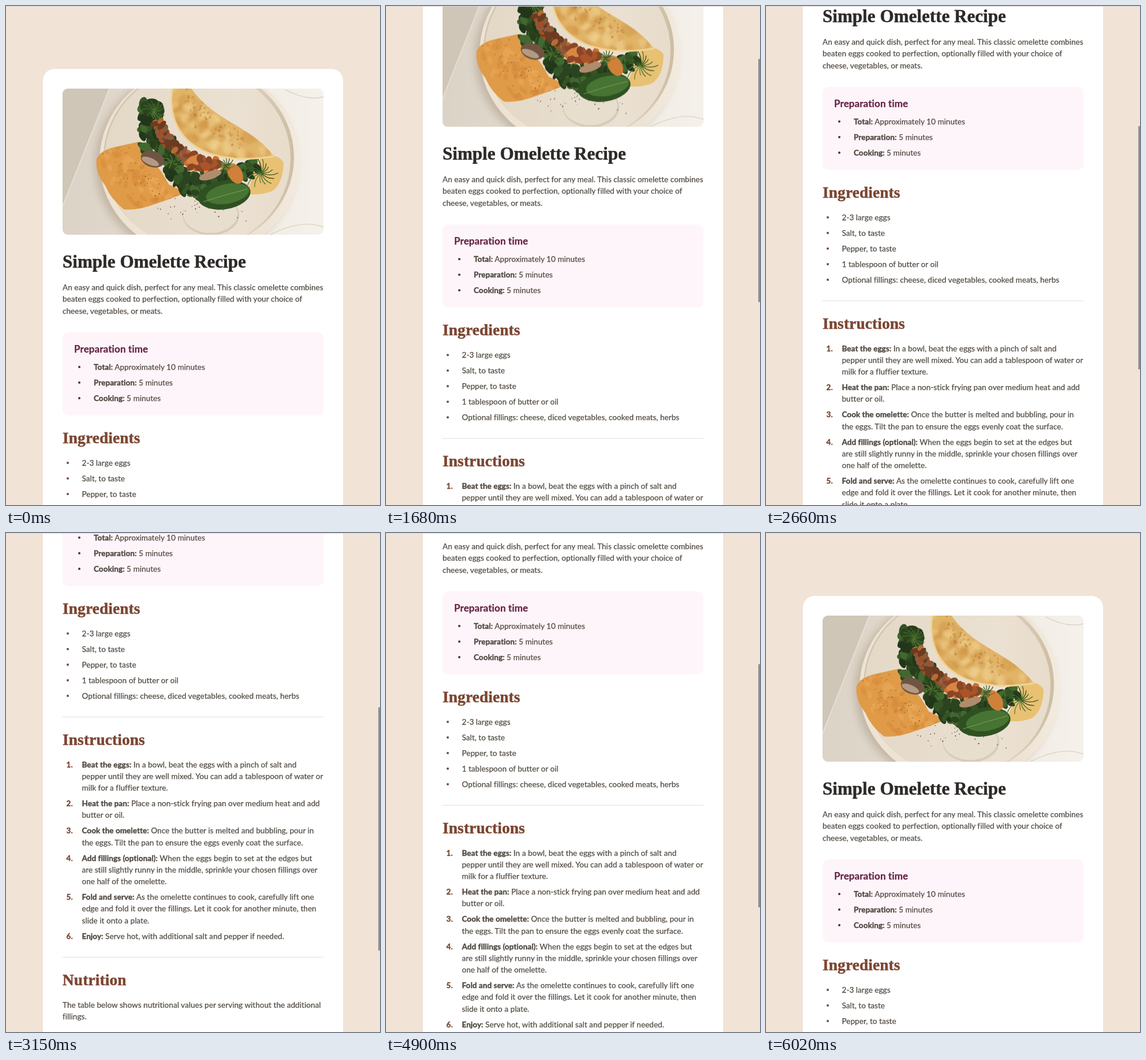
Animation, 648 px wide and 864 px high, one loop 6.65 s. Source, as an HTML page with a canvas:

```html
<!DOCTYPE html>
<html lang="en">
<head>
<meta charset="utf-8">
<title>Omelette recipe</title>
<style>
  html, body { margin: 0; width: 100%; height: 100%; overflow: hidden; background: #f1e3d6; }
  #stage { position: relative; width: 648px; height: 864px; overflow: hidden; background: #f1e3d6; }
  #page { position: absolute; left: 0; top: 0; width: 648px; height: 1769px; }
  #page > * { position: absolute; }
  .card { left: 64px; top: 109px; width: 520px; height: 1553px; border-radius: 20px; background: #fff; }
  .photo { left: 98px; top: 143px; width: 452px; height: 253px; border-radius: 9px; }
  .prep { left: 98px; top: 564.5px; width: 452px; height: 144.5px; border-radius: 10px; background: #fef5fa; }
  .text { font: 400 13.5px/20px Lato, sans-serif; letter-spacing: .055px; color: #514a42; white-space: pre; -webkit-text-stroke: .25px; }
  .text b, .strong { font-weight: 700; -webkit-text-stroke: .4px; }
  .strong { color: #7b4631; }
  .sub { font: 700 16.9px/20px Lato, sans-serif; letter-spacing: .14px; color: #652344; }
  .h1, .h2 { font: 700 27.2px/20px "Liberation Serif", serif; letter-spacing: .2px; color: #7b4631; -webkit-text-stroke: .5px; }
  .h1 { font-size: 31px; letter-spacing: .05px; color: #2d2a28; }
  .rule { left: 98px; width: 452px; height: 1px; background: #e2dfdb; }
  .dot { width: 4px; height: 4px; border-radius: 50%; background: #7b4631; }
  .dot.rose { background: #652344; }
  #thumb { position: absolute; right: 0; top: 0; width: 3.5px; height: 421px; background: #929090; }
  #edge { position: absolute; left: 0; top: 0; width: 648px; height: 1px; background: #dcd8da; }
</style>
</head>
<body>
<div id="stage">
  <div id="page">
    <div class="card"></div>
    <canvas class="photo"></canvas>
    <div class="prep"></div>
  </div>
  <div id="thumb"></div>
  <div id="edge"></div>
</div>
<script>
const page = document.getElementById('page');
const thumb = document.getElementById('thumb');
const LINE = 20.25, GAP = 6.75;

function add(cls, x, y, html = '') {
  const el = document.createElement('div');
  el.className = cls;
  el.style.left = x + 'px';
  el.style.top = y + 'px';
  el.innerHTML = html;
  page.append(el);
}
// y is the vertical centre of the line
const text = (x, y, html, cls = '') => add('text ' + cls, x, y - 10.5, html);
const lines = (x, y, list) => list.forEach((s, i) => text(x, y + i * LINE, s));
const rule = y => add('rule', 98, y - 0.5);
const dot = (x, y, cls = '') => add('dot ' + cls, x - 2, y - 2.5);

function buildPage() {
  text(98, 443, 'Simple Omelette Recipe', 'h1');
  lines(98, 487.5, [
    'An easy and quick dish, perfect for any meal. This classic omelette combines',
    'beaten eggs cooked to perfection, optionally filled with your choice of',
    'cheese, vegetables, or meats.'
  ]);

  text(118, 594, 'Preparation time', 'sub');
  [['Total', 'Approximately 10 minutes'], ['Preparation', '5 minutes'], ['Cooking', '5 minutes']]
    .forEach(([name, value], i) => {
      const y = 625.5 + i * (LINE + GAP);
      dot(127, y, 'rose');
      text(152, y, `<b>${name}:</b> ${value}`);
    });

  text(98, 748, 'Ingredients', 'h2');
  ['2-3 large eggs', 'Salt, to taste', 'Pepper, to taste', '1 tablespoon of butter or oil',
    'Optional fillings: cheese, diced vegetables, cooked meats, herbs']
    .forEach((s, i) => {
      const y = 791 + i * (LINE + GAP);
      dot(107, y);
      text(131.5, y, s);
    });

  rule(935.5);
  text(98, 975, 'Instructions', 'h2');
  const steps = [
    ['<b>Beat the eggs:</b> In a bowl, beat the eggs with a pinch of salt and',
      'pepper until they are well mixed. You can add a tablespoon of water or',
      'milk for a fluffier texture.'],
    ['<b>Heat the pan:</b> Place a non-stick frying pan over medium heat and add',
      'butter or oil.'],
    ['<b>Cook the omelette:</b> Once the butter is melted and bubbling, pour in',
      'the eggs. Tilt the pan to ensure the eggs evenly coat the surface.'],
    ['<b>Add fillings (optional):</b> When the eggs begin to set at the edges but',
      'are still slightly runny in the middle, sprinkle your chosen fillings over',
      'one half of the omelette.'],
    ['<b>Fold and serve:</b> As the omelette continues to cook, carefully lift one',
      'edge and fold it over the fillings. Let it cook for another minute, then',
      'slide it onto a plate.'],
    ['<b>Enjoy:</b> Serve hot, with additional salt and pepper if needed.']
  ];
  let y = 1018;
  steps.forEach((step, i) => {
    text(104.5, y, `${i + 1}.`, 'strong');
    lines(131.5, y, step);
    y += step.length * LINE + GAP;
  });

  rule(1351.5);
  text(98, 1391, 'Nutrition', 'h2');
  lines(98, 1434, [
    'The table below shows nutritional values per serving without the additional',
    'fillings.'
  ]);
  [['Calories', '277kcal'], ['Carbs', '0g'], ['Protein', '20g'], ['Fat', '22g']]
    .forEach(([name, value], i) => {
      const rowY = 1494.7 + i * 41.3;
      text(125, rowY, name);
      text(331, rowY, value, 'strong');
      if (i < 3) rule(rowY + 20);
    });
}

function drawPhoto() {
  const canvas = document.querySelector('.photo');
  const scale = Math.max(1, window.devicePixelRatio || 1);
  canvas.width = 452 * scale;
  canvas.height = 253 * scale;
  const c = canvas.getContext('2d');
  c.scale(scale, scale);

  let seed = 7;
  const rand = () => (seed = (seed * 16807) % 2147483647) / 2147483647;
  const around = spread => (rand() + rand() - 1) * spread;
  const pick = list => list[Math.floor(rand() * list.length)];

  function across(...colors) {
    const g = c.createLinearGradient(0, 0, 452, 0);
    colors.forEach((col, i) => g.addColorStop(i / (colors.length - 1), col));
    return g;
  }
  function shape(fill, d) {
    const path = new Path2D(d);
    c.fillStyle = fill;
    c.fill(path);
    return path;
  }
  function stroke(color, width, d) {
    c.strokeStyle = color;
    c.lineWidth = width;
    c.stroke(new Path2D(d));
  }
  function oval(fill, x, y, rx, ry, turn = 0) {
    c.beginPath();
    c.ellipse(x, y, rx, ry, turn, 0, 7);
    c.fillStyle = fill;
    c.fill();
  }
  // scatters bits around a curve from a to b, bent towards m
  function scatter(count, a, m, b, spread, size, colors) {
    for (let i = 0; i < count; i++) {
      const t = rand(), u = 1 - t;
      const [x, y] = [0, 1].map(k => u * u * a[k] + 2 * u * t * m[k] + t * t * b[k] + around(spread));
      const r = size * (0.5 + rand() * 0.5);
      oval(pick(colors), x, y, r, r * (0.45 + rand() * 0.4), rand() * 3);
    }
  }
  function herb(x, y, size) {
    for (let i = 0; i < 16; i++) {
      const a = i * 0.4, r = size * (0.5 + rand() * 0.5);
      stroke(pick(['#2f4d1c', '#46692b', '#5a7f38']), 1.3,
        `M${x},${y} Q${x + Math.cos(a + 0.4) * r * 0.6},${y + Math.sin(a + 0.4) * r * 0.6} ` +
        `${x + Math.cos(a) * r},${y + Math.sin(a) * r}`);
    }
  }

  // marble
  c.fillStyle = across('#dbd3c6', '#e2dace', '#f0ebe2', '#f5f1eb');
  c.fillRect(0, 0, 452, 253);
  shape('#cfc6b7', 'M0,0 H81 L0,204 Z');
  stroke('#eae3d7', 1.5, 'M81,0 L0,204');
  stroke('#d5cbbc', 1.2, 'M386,2 Q425,22 452,14 M360,253 Q415,225 452,240');

  // plate
  c.filter = 'blur(7px)';
  oval('rgba(130,108,80,.3)', 230, 130, 174, 165);
  c.filter = 'none';
  oval(across('#eee3d2', '#eee3d2', '#eadfcf', '#f6efe4'), 238, 125, 174, 165);
  oval(across('#c9bba5', '#d9cdb9', '#e2d6c4', '#c2b095'), 236, 119, 165, 157);
  oval(across('#e2d6c4', '#e6dbca', '#ebe1d2', '#e6d9c6'), 234, 121, 161, 155);
  oval('#d8cbb8', 257, 219, 49, 35);
  oval('#e8dece', 256, 217, 47, 33);
  scatter(40, [165, 210], [230, 190], [320, 220], 22, 1.4, ['#5f4c39', '#8a745c']);

  // mash
  const mash = shape('#e09b48',
    'M59,122 Q66,106 92,101 L132,92 Q140,108 152,120 Q172,142 184,166 L214,180 Q190,190 166,198 ' +
    'Q130,212 106,209 Q84,192 74,168 Q56,146 59,122 Z');
  c.save();
  c.clip(mash);
  scatter(60, [70, 120], [110, 160], [190, 190], 45, 9, ['rgba(240,178,98,.35)', 'rgba(200,122,44,.25)']);
  scatter(70, [75, 115], [130, 150], [190, 190], 45, 1.3, ['#8d5522', '#b06f2e']);
  c.restore();

  // lower fold
  shape('#e8c173', 'M345,116 Q374,112 383,128 Q382,166 362,178 Q340,186 318,182 Z');

  // greens and filling
  const greens = ['#22361a', '#2b441f', '#345426', '#42672f', '#283d1c'];
  scatter(90, [152, 34], [158, 60], [160, 104], 24, 13, greens);
  scatter(90, [182, 110], [196, 158], [250, 182], 22, 13, greens);
  scatter(70, [245, 160], [280, 150], [330, 140], 16, 10, greens);
  oval('#2f5122', 280, 184, 46, 25, -0.15);
  oval('#477433', 286, 182, 38, 17, -0.2);
  stroke('#7c9f58', 1, 'M244,196 Q280,184 320,174');
  scatter(55, [165, 62], [180, 100], [225, 122], 14, 9, ['#a04f25', '#bb6a33', '#6b3b22', '#8b5a3c']);
  scatter(50, [215, 125], [240, 130], [268, 132], 15, 10, ['#a9542a', '#c8702f', '#d98642', '#8a4626']);
  oval('#6f5443', 156, 122, 21, 14, 0.3);
  oval('#b59a83', 152, 126, 16, 6, 0.4);
  oval('#b08c6d', 256, 150, 20, 7, -0.3);
  oval('#cf8139', 299, 147, 12, 19, -0.5);
  herb(158, 38, 22);
  herb(190, 128, 20);
  herb(282, 134, 18);
  herb(344, 146, 32);

  // omelette
  const omelette = shape('#e1b468', 'M190,-2 C178,75 230,140 367,118 C325,62 262,58 222,-2 Z');
  c.save();
  c.clip(omelette);
  c.filter = 'blur(2px)';
  scatter(70, [205, 10], [225, 80], [345, 112], 35, 13, ['rgba(240,208,140,.5)', 'rgba(205,142,62,.4)']);
  c.filter = 'none';
  scatter(60, [208, 10], [240, 60], [330, 105], 35, 3, ['rgba(168,100,38,.4)', 'rgba(196,130,56,.5)']);
  c.restore();
  stroke('#f0d496', 3, 'M190,0 C179,75 230,139 367,117');
}

const LOOP = 6650, STEP = 70;
// each scroll: start, duration, offset reached
const scrolls = [
  [910, 70, 1], [1260, 630, 234.5], [2170, 280, 425], [2660, 280, 617], [3150, 140, 805],
  [3570, 140, 905], [3990, 630, 464], [4900, 140, 112], [5320, 210, 0]
];
const clamp = v => Math.min(1, Math.max(0, v));
const ease = p => p < 0.5 ? (2 * p) ** 2.2 / 2 : 1 - (2 - 2 * p) ** 2.2 / 2;

function scrollAt(t) {
  return scrolls.reduce((y, [start, time, to]) => y + (to - y) * ease(clamp((t - start) / time)), 0);
}

const thumbAlpha = t => Math.min(clamp((t - 840) / 140), clamp((6020 - t) / 350));

function frame() {
  const now = performance.now() % LOOP;
  const t = Math.floor(now / STEP) * STEP;
  const y = scrollAt(t);
  page.style.transform = `translateY(${-y}px)`;
  thumb.style.transform = `translateY(${0.5 + y * 864 / 1769}px)`;
  thumb.style.opacity = thumbAlpha(t);
  requestAnimationFrame(frame);
}

buildPage();
drawPhoto();
frame();
</script>
</body>
</html>
```
